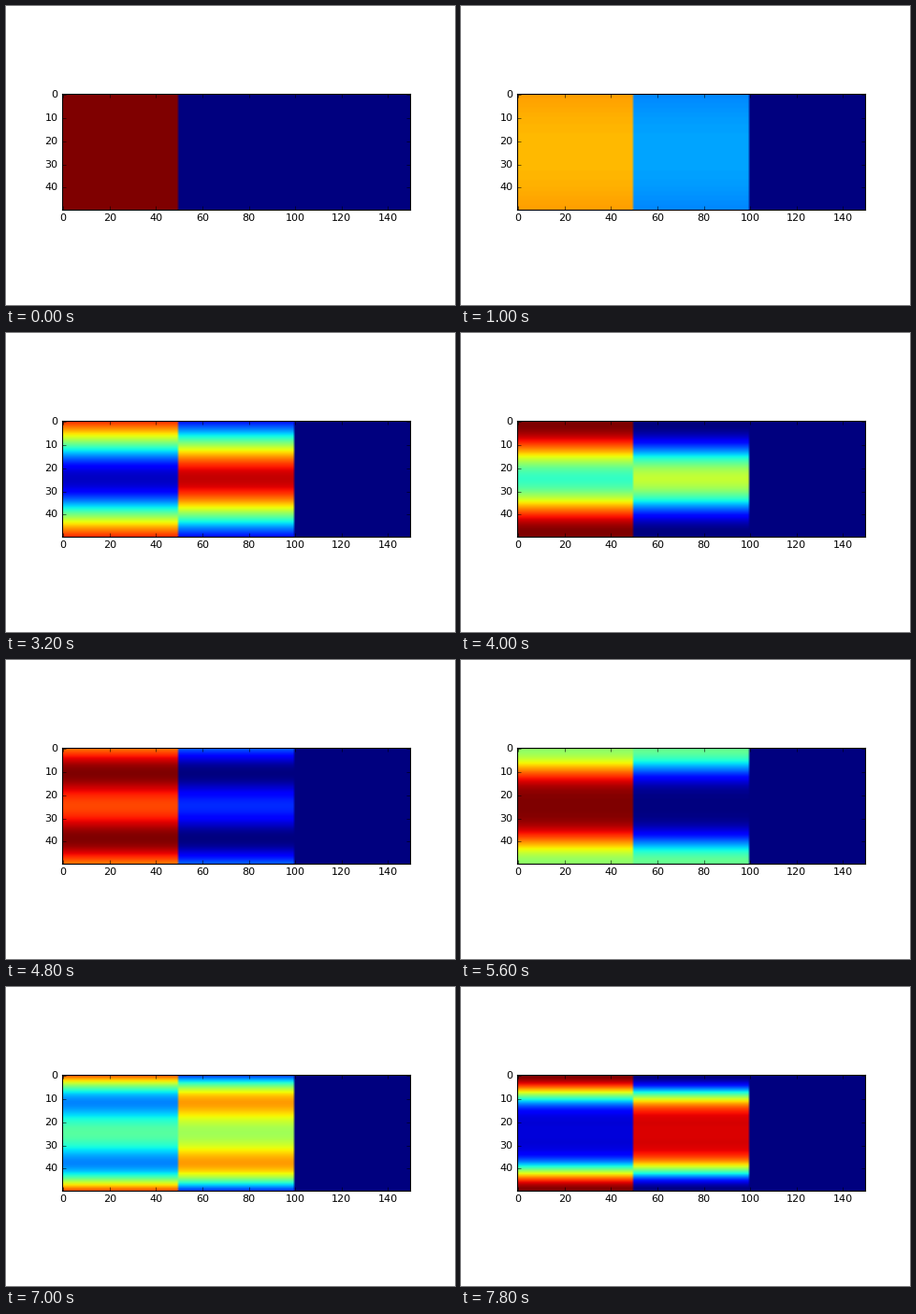
Animation, 480 px wide and 320 px high, one loop 8000 ms. Source, as a matplotlib script:

```python
import numpy as np
import matplotlib.pyplot as plt
from matplotlib.animation import FuncAnimation

plt.style.use("classic")
plt.rcParams.update({
    "figure.dpi": 80,
    "savefig.dpi": 80,
    "figure.facecolor": "white",
    "savefig.facecolor": "white",
    "font.family": "DejaVu Sans",
    "font.size": 10,
    "xtick.labelsize": 10,
    "ytick.labelsize": 10,
    "figure.subplot.bottom": 0.125,
})

ROWS, BLOCK = 50, 50
FRAMES, INTERVAL = 40, 200
HALF_RABI = np.pi / 27.7  # half the resonant Rabi angle per frame

detuning = np.linspace(-1, 1, ROWS)  # in units of the Rabi frequency
freq = np.sqrt(1 + detuning**2)


def populations(n):
    """Three level populations side by side, one detuning per row."""
    upper = (np.sin(HALF_RABI * freq * n) / freq) ** 2
    levels = np.stack([1 - upper, upper, np.zeros(ROWS)], axis=1)
    return np.repeat(levels, BLOCK, axis=1)


fig, ax = plt.subplots(figsize=(6, 4))
image = ax.imshow(populations(0), cmap="jet", vmin=0, vmax=1,
                  interpolation="bilinear", interpolation_stage="rgba")
ax.set_xticks(range(0, 150, 20))
ax.set_yticks(range(0, 50, 10))


def update(n):
    image.set_data(populations(n))
    return [image]


anim = FuncAnimation(fig, update, frames=FRAMES, interval=INTERVAL,
                     repeat=True, repeat_delay=0, blit=False)
plt.show()
```
